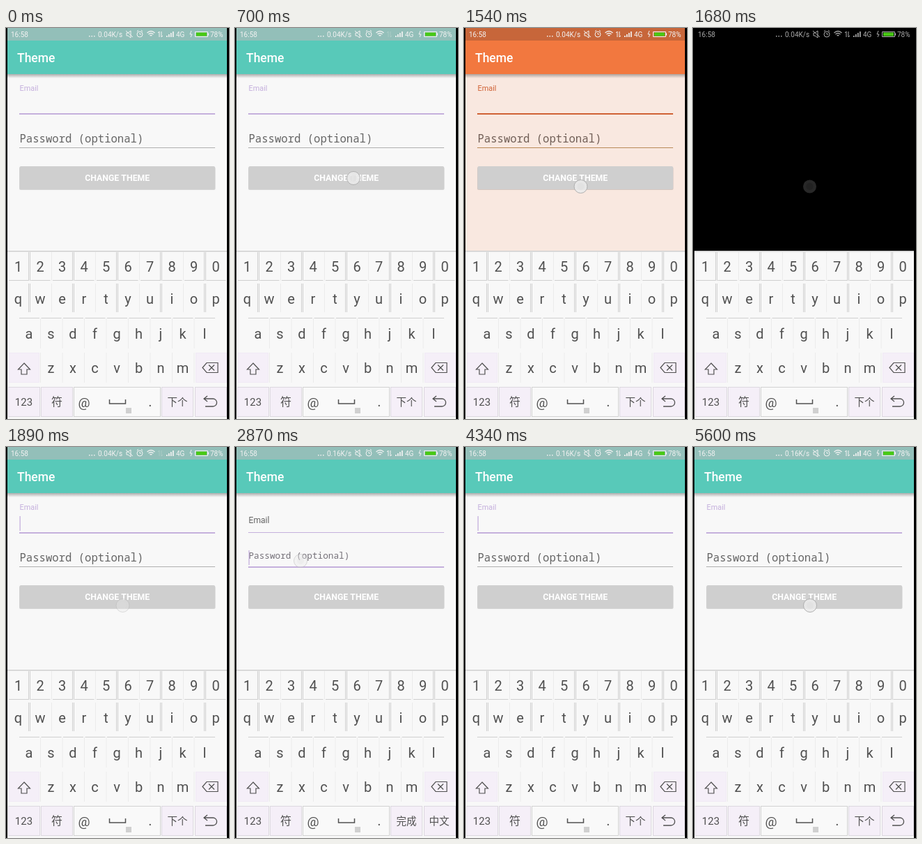
Write an HTML page with a canvas that moves like this. It is 320 by 560 pixels and loops after 5670 ms.

```html
<!DOCTYPE html>
<html>
<head>
<meta charset="utf-8">
<style>
html, body { margin: 0; width: 100%; height: 100%; overflow: hidden; background: #000; }
canvas { display: block; }
</style>
</head>
<body>
<canvas id="stage" width="320" height="560"></canvas>
<script>
const LOOP = 5670, STEP = 70;
const LEFT = 2, WIDTH = 315;
const SANS = 'Roboto, sans-serif';
const MONO = '"Noto Sans Mono", monospace';
const CJK = '"Noto Sans CJK SC", "Noto Sans CJK", sans-serif';
const c = document.getElementById('stage').getContext('2d');

const TEAL = { status: '#93bfb9', bar: '#58c9b9', bg: '#f8f8f8', accent: [197, 176, 221], hint: [100, 100, 100], line: '#b0b0b0' };
const ORANGE = { status: '#c7663a', bar: '#f2783f', bg: '#f9e8e0', accent: [208, 98, 53], hint: [112, 94, 86], line: '#b98a58' };

// x, y, press, release, gone
const TOUCHES = [
  [170, 215, 490, 840, 980],
  [167.5, 227, 1260, 1680, 2240],
  [94, 163, 2450, 2800, 3220],
  [100, 100, 3500, 3700, 4270],
  [168, 227, 5390, 5670, 5670]
];
const CURSOR_ON = [[140, 560], [980, 1330], [1890, 2240], [2800, 3220], [3640, 4060], [4340, 5390]];
const TO_PASSWORD = 2760, TO_EMAIL = 3697, RAISE_DELAY = 75;

const within = (t, a, b) => t >= a && t < b;
const rgb = a => `rgb(${a.map(Math.round)})`;
const mix = (a, b, k) => a + (b - a) * k;

function rect(x, y, w, h, fill) {
  c.fillStyle = fill;
  c.fillRect(x, y, w, h);
}

function rounded(x, y, w, h, r, fill) {
  c.beginPath();
  c.roundRect(x, y, w, h, r);
  c.fillStyle = fill;
  c.fill();
}

function disc(x, y, r, fill) {
  c.beginPath();
  c.arc(x, y, r, 0, 7);
  c.fillStyle = fill;
  c.fill();
}

function text(s, x, y, font, fill, align = 'left') {
  c.font = font;
  c.fillStyle = fill;
  c.textAlign = align;
  c.fillText(s, x, y);
}

function path(d, color, width = 1) {
  c.strokeStyle = color;
  c.lineWidth = width;
  c.stroke(new Path2D(d));
}

function ease(t, start) {
  const p = Math.min(1, Math.max(0, (t - start) / 200));
  return 1 - (1 - p ** 1.6) ** 3;
}

function statusBar(t, color) {
  const small = `10px ${SANS}`;
  text('16:58', 7, 13, small, color);
  for (let i = 0; i < 3; i++) rect(119 + i * 3.5, 11, 1.5, 1.5, color);
  text(t < 2660 ? '0.04K/s' : '0.16K/s', 132, 13, small, color);
  path('M173 7h2l4-3v10l-4-3h-2zM172 4l10 9', color);
  path('M196 9a4 4 0 1 1-8 0a4 4 0 1 1 8 0M192 7v2h2M188 5l2-2M196 5l-2-2', color);
  path('M202.500 7q5.500-5 11 0M204.500 9q3.500-3 7 0M206.500 11q1.500-1 3 0', color, 1.3);
  c.globalAlpha = within(t, 700, 980) || within(t, 1890, 2240) ? 0.25 : 1;
  path('M220 13V5l-2 2M223 5v8l2-2', color);
  c.globalAlpha = 1;
  for (let i = 0; i < 4; i++) rect(230 + i * 3, 11 - i * 2, 1.7, 2 + i * 2, color);
  text('4G', 244, 13, small, color);
  path('M266 4l-2 5h3l-2 4', color);
  path('M271.500 5.500h18v7h-18zM290.500 7.500v3', color);
  rect(273, 6.5, 15, 5, '#48c914');
  text('78%', 293, 13, small, color);
}

function field(label, baseline, lineY, family, focused, collapsed, thin, th) {
  const size = mix(10.9, 15.6, (1 - collapsed) ** 5);
  const color = focused ? th.hint.map((v, i) => mix(v, th.accent[i], collapsed)) : th.hint;
  text(label, 19.5, baseline - 25.5 * collapsed, `${size}px ${family}`, rgb(color));
  if (focused) rect(19, lineY, 281, 2, rgb(th.accent));
  else rect(19, lineY, 281, 1, thin);
}

function form(t, th) {
  rect(LEFT, 0, WIDTH, 319, th.bg);
  const shadow = c.createLinearGradient(0, 66, 0, 72);
  shadow.addColorStop(0, 'rgba(0,0,0,.3)');
  shadow.addColorStop(1, 'rgba(0,0,0,0)');
  rect(LEFT, 66, WIDTH, 6, shadow);
  rect(LEFT, 0, WIDTH, 18, th.status);
  rect(LEFT, 18, WIDTH, 48, th.bar);
  text('Theme', 16, 49, `500 17.5px ${SANS}`, '#fff');

  const onPassword = within(t, TO_PASSWORD, TO_EMAIL);
  const raised = t < TO_EMAIL ? ease(t, TO_PASSWORD + RAISE_DELAY) : 1 - ease(t, TO_EMAIL);
  const email = t < TO_EMAIL ? 1 - ease(t, TO_PASSWORD) : ease(t, TO_EMAIL + RAISE_DELAY - 15);
  field('Email', 115, 122, SANS, !onPassword, email, t < 2940 ? rgb(th.accent) : th.line, th);
  field('Password (optional)', 164, 171, MONO, onPassword, raised, th.line, th);
  if (CURSOR_ON.some(([a, b]) => within(t, a, b)))
    rect(19.5, onPassword ? 148 : 99, 1.3, 21, rgb(th.accent));

  rounded(19, 199, 281.5, 33, 2, 'rgba(0,0,0,.14)');
  rounded(19.5, 198, 280.5, 33, 2, '#cfcfcf');
  text('CHANGE THEME', 159.7, 219, `bold 12.3px ${SANS}`, '#fff', 'center');
}

function keyBox(x, y, w, h, fill, border = '#d2d2d2') {
  rect(x, y, w, h, fill);
  c.strokeStyle = border;
  c.lineWidth = 1;
  c.strokeRect(x + 0.5, y + 0.5, w - 1, h - 1);
}

function keyboard(t) {
  const ink = '#505050', plain = '#f9f9f9', lilac = '#f5eff8', faint = '#ebebeb', edge = '#cfcfcf';
  rect(LEFT, 319, WIDTH, 241, '#f8f8f8');
  rect(LEFT, 319, WIDTH, 1.5, edge);
  for (const y of [321, 366]) {
    for (let i = 0; i < 5; i++) {
      rect(32 + i * 63, y, 1, 41, edge);
      rect(34 + i * 63, y, 1, 41, edge);
      if (i < 4) rect(65 + i * 63, y, 1, 41, faint);
    }
  }
  for (let i = 0; i < 10; i++) rect(4 + i * 31.5, 361, 28, 1, edge);
  for (let i = 0; i < 9; i++) rect(19 + i * 31.5, 415, 29, 1, edge);
  for (let i = 0; i < 8; i++) {
    rect(49 + i * 31.5, 416, 1, 43, faint);
    rect(49 + i * 31.5, 465, 1, 43, faint);
  }
  keyBox(3, 465, 45, 43, lilac, '#f1eaf5');
  keyBox(272, 465, 45, 43, lilac, '#f1eaf5');
  keyBox(97, 514, 125, 43, plain);
  for (const x of [3, 50, 223, 271]) keyBox(x, 514, 46, 43, lilac, '#dcd8df');

  const rows = [['1234567890', 17.5, 349], ['qwertyuiop', 17.5, 395], ['asdfghjkl', 33, 445], ['zxcvbnm', 64.5, 494]];
  for (const [keys, x, y] of rows)
    [...keys].forEach((k, i) => text(k, x + i * 31.5, y, `20px ${SANS}`, ink, 'center'));

  path('M26 480l8.500 9h-4.500v7h-8v-7h-4.500z', ink, 1.2);
  path('M282 486.500l6-7h16v14h-16zM291 482.500l8 8M299 482.500l-8 8', ink, 1.2);
  text('123', 25.5, 541, `15px ${SANS}`, ink, 'center');
  text('符', 73, 541, `16px ${CJK}`, ink, 'center');
  text('@', 112, 543, `19px ${SANS}`, ink, 'center');
  path('M148.500 532v6h23v-6', ink, 1.5);
  text('.', 207, 542, `20px ${SANS}`, ink, 'center');
  rect(172, 544, 8, 8, '#d0d0d0');

  const done = within(t, 2800, 3990);
  text(done ? '完成' : '下个', 246, 541, `14.5px ${CJK}`, ink, 'center');
  if (done) text('中文', 293, 541, `14.5px ${CJK}`, ink, 'center');
  else path('M289 527l-5 4 5 4M284 531h13a5.500 5.500 0 0 1 0 11h-11', ink, 1.3);
}

function touch(t, dark) {
  for (const [x, y, press, release, gone] of TOUCHES) {
    if (!within(t, press, gone)) continue;
    c.globalAlpha = t < release ? Math.min(1, (t - press + STEP) / 140) : 0.5 - 0.3 * (t - release) / (gone - release);
    disc(x, y, 9.5, dark ? '#505050' : 'rgba(235,235,235,.85)');
    if (!dark) {
      c.strokeStyle = '#b0b0b0';
      c.lineWidth = 1;
      c.stroke();
    }
    disc(x, y, 5, dark ? '#1c1c1c' : 'rgba(222,222,222,.5)');
    c.globalAlpha = 1;
  }
}

function draw(now) {
  const t = Math.floor((now % LOOP) / STEP) * STEP;
  const dark = within(t, 910, 980) || within(t, 1680, 1750);
  rect(0, 0, 320, 560, '#000');
  if (!dark) form(t, within(t, 980, 1680) ? ORANGE : TEAL);
  statusBar(t, dark ? '#aaa' : '#f2f2f2');
  keyboard(t);
  touch(t, dark);
}

let start;
function loop(now) {
  start ??= now;
  draw(now - start);
  requestAnimationFrame(loop);
}
requestAnimationFrame(loop);
</script>
</body>
</html>
```
